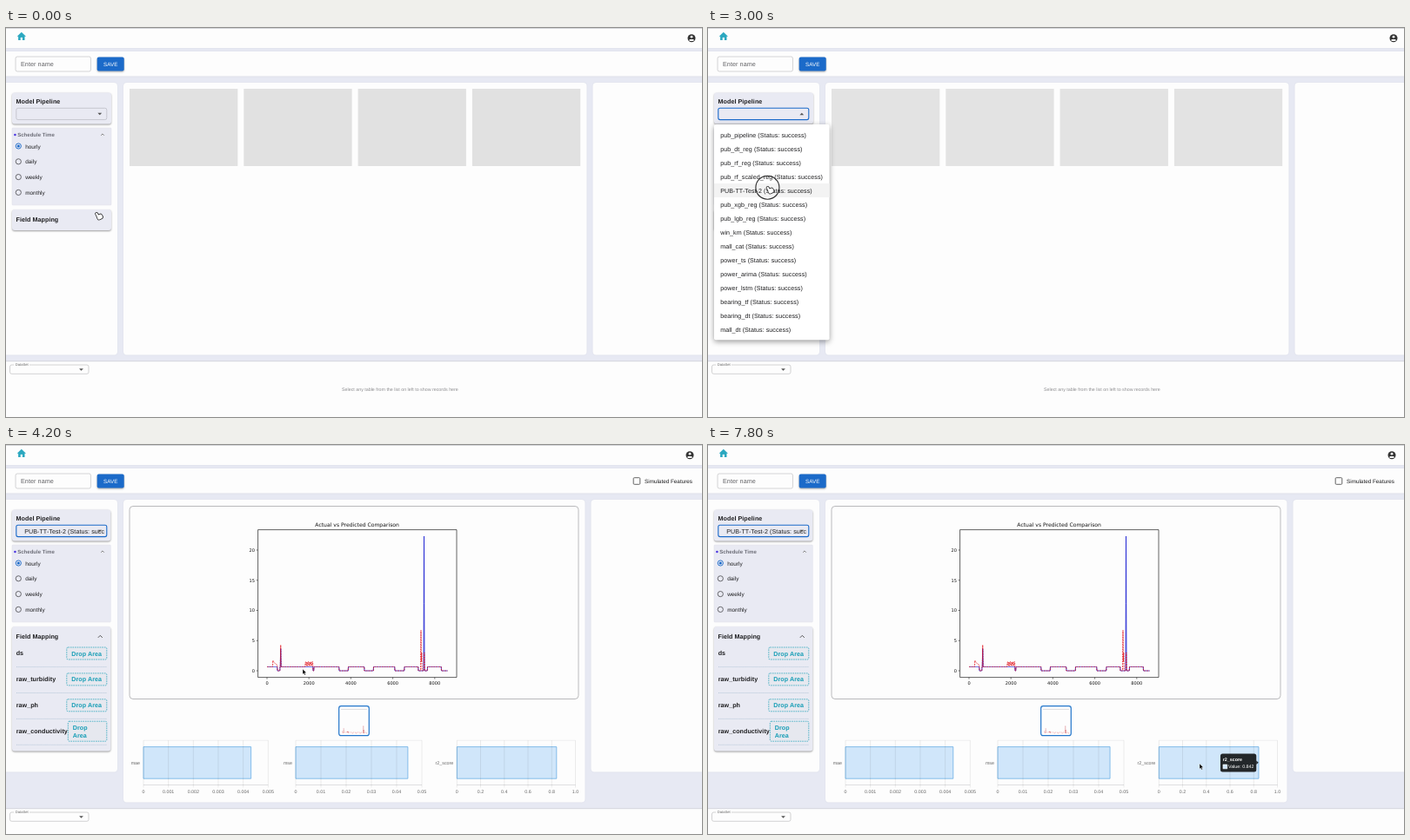
Recreate the animation shown at these times as an HTML page with a canvas. Size 800x448 px, loop 8 s.

```html
<!DOCTYPE html>
<html lang="en">
<head>
<meta charset="utf-8">
<title>Model pipeline setup</title>
<style>
html, body { margin: 0; width: 100%; height: 100%; overflow: hidden; background: #e8eaf4; }
canvas { display: block; width: 800px; height: 448px; }
</style>
</head>
<body>
<canvas id="stage" width="800" height="448"></canvas>
<script>
const c = document.getElementById('stage').getContext('2d');
const LOOP = 8000, STEP = 200;
const OPEN = 1200, CLOSE = 3200, LOADED = 3400, READY = 3600;
const CLICKS = [1000, 3000];
const SANS = '"Liberation Sans", Arial, sans-serif';
const DEJAVU = '"DejaVu Sans", sans-serif';
const WHITE = '#fdfdfd', CARD = '#e9eaf3', INK = '#1c1c1e', BLUE = '#1b6ac9', TEAL = '#139cb5';

const MODELS = ['pub_pipeline', 'pub_dt_reg', 'pub_rf_reg', 'pub_rf_scaled_reg', 'PUB-TT-Test-2',
  'pub_xgb_reg', 'pub_lgb_reg', 'win_km', 'mall_cat', 'power_ts', 'power_arima', 'power_lstm',
  'bearing_tf', 'bearing_dt', 'mall_dt'].map(name => name + ' (Status: success)');

const METRICS = [
  { name: 'mae', x: 158, w: 143.3, max: 0.005, digits: 3, value: 0.00432 },
  { name: 'mse', x: 333, w: 145, max: 0.05, digits: 2, value: 0.04451 },
  { name: 'r2_score', x: 518.3, w: 136.2, max: 1, digits: 1, value: 0.842 }
];

// Pointer stops: time, x, y
const PATH = [
  [0, 103.5, 213], [1000, 84, 98], [1800, 78, 122], [3000, 68, 183], [3400, 68, 183.5], [4200, 341, 258],
  [5000, 400, 365], [5400, 291.5, 364], [6200, 220, 365], [7200, 430, 368], [7800, 565, 367]
];

const clamp = v => Math.max(0, Math.min(1, v));

function pointer(t) {
  const i = Math.max(1, PATH.findIndex(p => p[0] >= t));
  const a = PATH[i - 1], b = PATH[i], k = clamp((t - a[0]) / (b[0] - a[0]));
  return { x: a[1] + (b[1] - a[1]) * k, y: a[2] + (b[2] - a[2]) * k };
}

function text(s, x, y, size, color = INK, { bold, align = 'left', font = SANS, gap = 0 } = {}) {
  c.font = (bold ? 'bold ' : '') + size + 'px ' + font;
  c.letterSpacing = gap + 'px';
  c.textAlign = align;
  c.fillStyle = color;
  c.fillText(s, x, y);
}
const label = (s, x, y, color, bold) => text(s, x, y, 7.11, color, { bold, gap: 0.067 });

function box(x, y, w, h, r, fill, stroke, lw = 0.6) {
  c.beginPath();
  c.roundRect(x, y, w, h, r);
  if (fill) { c.fillStyle = fill; c.fill(); }
  if (stroke) { c.strokeStyle = stroke; c.lineWidth = lw; c.stroke(); }
}

function line(points, color, lw, dash = []) {
  c.beginPath();
  points.forEach(([x, y]) => c.lineTo(x, y));
  c.strokeStyle = color;
  c.lineWidth = lw;
  c.setLineDash(dash);
  c.stroke();
  c.setLineDash([]);
}

function shape(points, fill) {
  c.beginPath();
  points.forEach(([x, y]) => c.lineTo(x, y));
  c.closePath();
  c.fillStyle = fill;
  c.fill();
}

function circle(x, y, r, fill, stroke, lw = 0.9) {
  c.beginPath();
  c.arc(x, y, r, 0, 7);
  if (fill) { c.fillStyle = fill; c.fill(); }
  if (stroke) { c.strokeStyle = stroke; c.lineWidth = lw; c.stroke(); }
}

function shadowed(blur, dy, alpha, draw) {
  c.save();
  c.shadowBlur = blur;
  c.shadowOffsetY = dy;
  c.shadowColor = `rgba(0,0,0,${alpha})`;
  draw();
  c.restore();
}
const card = (y, h, w) => shadowed(2, 1, 0.38, () => box(7, y, w, h, 3, CARD));
const triangle = (x, y, d) => shape([[x - 2.4, y - d * 1.2], [x + 2.4, y - d * 1.2], [x, y + d * 1.3]], '#555');
const chevron = (x, y, d, r, color) => line([[x - r, y + d * r / 2], [x, y - d * r / 2], [x + r, y + d * r / 2]], color, 0.9);

function icons(dx) {
  shape([[12.6, 9.8], [17.8, 4.8], [23, 9.8]], '#2ba8c0');
  box(14.1, 9, 7.4, 5, 0, '#2ba8c0');
  box(16.7, 10.9, 2.2, 3.1, 0, WHITE);
  const x = 788 + dx;
  circle(x, 11.8, 4.5, '#333');
  circle(x, 10.2, 1.4, WHITE);
  box(x - 2.7, 12.9, 5.4, 2, 1, WHITE);
}

function frameLayout(ready) {
  const dx = ready ? -2 : 0, grow = ready ? 35 : 0;
  box(0, 0, 800, 448, 0, '#e7e9f3');
  shadowed(2, 0, 0.06, () => {
    box(0, 0, 800, 23, 0, WHITE);
    box(0, 27, 800, 28.5, 0, WHITE);
    box(-5, 63, 133, 313.5, 4, WHITE);
    box(135, 63, 532.5 + dx, 313.5 + grow, 4, WHITE);
    box(674.5 + dx, 63, 140, 313.5, 4, WHITE);
  });
  box(0, 0, 800, 0.8, 0, '#c9cacf');
  box(0, 383.5 + grow, 800, 0.8, 0, '#c9cacf');
  box(0, 384.3 + grow, 800, 100, 0, WHITE);
  icons(dx);

  box(11, 33, 86.5, 17, 2, null, '#b9b9bd');
  text('Enter name', 17, 44.4, 7.2, '#5f5f63', { gap: 0.07 });
  shadowed(2, 1, 0.35, () => box(104.7, 33.5, 31, 16, 2, BLUE));
  text('SAVE', 112, 44, 6.3, '#fff', { gap: 0.08 });

  box(4.5, 388 + grow, 90.5, 10.3, 2, null, '#b5b5b8');
  box(9, 386 + grow, 18, 4, 0, WHITE);
  text('DataSet', 10.8, 389.3 + grow, 4.15, '#666');
  triangle(86.5, 393.4 + grow, 1);
  text('Select any table from the list on left to show records here', 386, 418 + grow, 5.32, '#8c8c8f');
}

function modelSelect(t) {
  label('Model Pipeline', 11.6, 87.2, INK, true);
  const focus = t >= OPEN, open = focus && t < CLOSE;
  box(11.8, 92.3, 104, 13.3, 2, null, focus ? BLUE : '#b8b9c0', focus ? 1.1 : 0.7);
  if (t >= CLOSE) {
    c.save();
    c.beginPath();
    c.rect(13, 93, 100, 12);
    c.clip();
    label(MODELS[4], 21.2, 101.6);
    c.restore();
  }
  triangle(107.8, 99, open ? -1 : 1);
}

function schedule(w) {
  box(7, 115, w, 89, 1, CARD, '#dcdde6', 0.5);
  circle(10.4, 123, 1.3, '#4a35e0');
  text('Schedule Time', 13.2, 125.2, 6.05, '#6d6e78', { bold: true });
  chevron(111, 122.8, 1, 1.8, '#777');
  ['hourly', 'daily', 'weekly', 'monthly'].forEach((s, i) => {
    const y = 136 + i * 17.8;
    circle(14.3, y, 3.1, null, i ? '#5a5a5e' : BLUE);
    if (!i) circle(14.3, y, 1.6, BLUE);
    text(s, 22.2, y + 2.5, 6.4);
  });
}

function dropArea(x, y, w, words) {
  const h = 5 + words.length * 9;
  c.setLineDash([1.6, 1]);
  box(x, y - h / 2, w, h, 1.5, '#e6e8ef', TEAL, 0.7);
  c.setLineDash([]);
  words.forEach((s, i) => label(s, x + 5.5, y + 2.5 + (i - (words.length - 1) / 2) * 9, TEAL, true));
}

function fieldMapping(loaded, w) {
  card(209, loaded ? 143.5 : 24, w);
  label('Field Mapping', 11.6, 223.2, INK, true);
  chevron(108.3, loaded ? 220.6 : 219, loaded ? 1 : -1, 2.5, '#444');
  if (!loaded) return;
  ['ds', 'raw_turbidity', 'raw_ph', 'raw_conductivity'].forEach((s, i) => {
    const y = 240 + i * 29.9;
    label(s, 11.7, y + 2.3, INK, true);
    line([[12, y + 15.6], [116, y + 15.6]], '#9db6cc', 0.6, [1.3, 1]);
    if (s.length < 15) dropArea(69.8, y, 46, ['Drop Area']);
    else dropArea(71.3, y, 44.5, ['Drop', 'Area']);
  });
}

function sidebar(t) {
  const w = t >= READY ? 113.3 : 114;
  card(74.5, 36, w);
  modelSelect(t);
  schedule(w);
  fieldMapping(t >= LOADED, w);
}

function skeleton(t, loaded) {
  const g = t < 1200 ? 225 + t / 120 : 235 - 14 * clamp((t - 2400) / 1000);
  const fill = `rgb(${g},${g},${g})`;
  if (!loaded) {
    for (let i = 0; i < 4; i++) box(142 + i * 131.3, 70, 124.3, 89, 0, fill);
    return;
  }
  box(142, 70, 518.3, 134, 0, fill);
  for (let i = 0; i < 6; i++) box(142 + i * 87.55, 211, 80.5, 35.5, 0, fill);
}

// Series values over x in stage pixels: a two-level signal with spikes
const LOWS = [[312, 3], [353, 1], [383, 10.5], [412, 10.5], [447, 11], [474, 10.5], [500.5, 8]];
const level = x => LOWS.some(([from, w]) => x >= from && x < from + w) ? 0 : 0.65;
const spike = (x, at, h) => h * Math.max(0, 1 - Math.abs(x - at) / 0.5);
const actual = x => level(x) + spike(x, 315.75, 3) + spike(x, 480.5, 22.3);
function predicted(x) {
  let v = level(x) + spike(x, 315.75, 3.6) + spike(x, 477, 6.7) + spike(x, 477.75, 3) + spike(x, 480.75, 3);
  if (x > 306.5 && x < 312) v += Math.exp((307 - x) / 4);
  if (x > 343.5 && x < 353) v += 0.5 + 0.35 * Math.sin(x * 4);
  return v;
}
function series(fn, x0, sx, y0, sy) {
  const points = [];
  for (let x = 300; x <= 507.5; x += 0.25) points.push([x0 + (x - 300) * sx, y0 - fn(x) * sy]);
  return points;
}

function comparison() {
  box(142, 70.5, 516, 222, 4, null, '#a9a9ad', 0.8);
  const opt = { font: DEJAVU, align: 'center' };
  text('Actual vs Predicted Comparison', 403.6, 94.2, 6.09, '#111', opt);
  box(289.6, 97.6, 228.4, 170, 0, null, '#222', 0.7);
  for (let i = 0; i < 5; i++) {
    const x = 300 + i * 48.2, y = 260 - i * 34.75;
    line([[x, 267.6], [x, 269.6]], '#222', 0.6);
    line([[287.6, y], [289.6, y]], '#222', 0.6);
    text(i * 2000, x, 275.8, 5.07, '#111', opt);
    text(i * 5, 286, y + 1.9, 5.07, '#111', { font: DEJAVU, align: 'right' });
  }
  c.lineJoin = 'round';
  line(series(actual, 300, 1, 260, 6.95), '#2226d4', 0.9);
  line(series(predicted, 300, 1, 260, 6.95), '#e2141c', 0.9, [1.7, 1.1]);

  box(382.7, 300.7, 34.6, 34, 2.5, WHITE, '#2376cb', 1.2);
  line([[385, 304.4], [415, 304.4]], '#c4c4c8', 0.6);
  line(series(predicted, 386, 0.14, 331.8, 1.25), '#d2696c', 0.5, [1.2, 0.8]);
  c.lineJoin = 'miter';
}

function barChart(m, dy, progress) {
  const top = 251 + dy, base = 302.3 + dy;
  line([[m.x, top], [m.x + m.w, top]], '#e2e2e4', 0.6);
  line([[m.x, base], [m.x + m.w, base]], '#d2d2d5', 0.7);
  box(m.x, 258.4 + dy, m.w * m.value / m.max * progress, 36.6, 0, '#d0e6fa', '#5ba7e2', 0.7);
  for (let i = 0; i <= 5; i++) {
    const x = m.x + m.w * i / 5;
    line([[x, top], [x, base + 3]], 'rgba(0,0,0,0.13)', 0.6);
    text(i ? (m.max * i / 5).toFixed(m.digits) : '0', x, 311.9 + dy, 5.33, '#666', { align: 'center' });
  }
  text(m.name, m.x - 4, 278.6 + dy, 5.33, '#666', { align: 'right' });
}

function tooltip(m, alpha) {
  const end = m.x + m.w * m.value / m.max, x = end - 44;
  c.globalAlpha = alpha;
  box(x, 355.4, 41.3, 21, 2.5, 'rgba(0,0,0,0.83)');
  shape([[x + 41.3, 363.5], [end - 0.3, 365.8], [x + 41.3, 368.1]], 'rgba(0,0,0,0.83)');
  text(m.name, x + 2.8, 363.5, 5.33, '#fff', { bold: true });
  box(x + 3, 368, 4.8, 4.8, 0, '#cfe6fb', '#fff', 0.6);
  text('Value: ' + m.value.toFixed(3), x + 9, 372.4, 5.33, '#fff');
  c.globalAlpha = 1;
}

function over(m, t) {
  const p = pointer(t);
  return t > READY && p.y > 347 && p.y < 384 && p.x >= m.x && p.x <= m.x + m.w * m.value / m.max;
}

function metrics(t, ready) {
  const progress = 1 - Math.pow(1 - clamp((t - LOADED + 5) / 1000), 4);
  METRICS.forEach(m => barChart(m, ready ? 89.2 : 0, progress));
  METRICS.forEach(m => {
    if (over(m, t)) tooltip(m, 1);
    else if (over(m, t - STEP)) tooltip(m, 0.38);
  });
}

function menu(t, p) {
  c.globalAlpha = 1 - clamp((t - CLOSE) / 210);
  shadowed(6, 2, 0.4, () => box(7, 111, 132.6, 248.3, 2, '#fff'));
  const row = Math.max(0, Math.floor((p.y - 113) / 16));
  box(7, 115 + row * 16, 132.6, 16, 0, row ? '#f3f3f3' : '#d6d6d6');
  MODELS.forEach((s, i) => label(s, 14.2, 125.6 + i * 16));
  c.globalAlpha = 1;
}

function hand() {
  c.rotate(-0.5);
  c.beginPath();
  c.roundRect(-1, 0, 2.2, 6, 1.1);
  c.roundRect(-1.4, 3.6, 6, 5, 1.8);
  c.strokeStyle = '#333';
  c.lineWidth = 1.7;
  c.stroke();
  c.fillStyle = '#fff';
  c.fill();
}

function arrow() {
  shape([[0, 0], [0, 6], [1.3, 4.9], [2.3, 7.1], [3.4, 6.6], [2.4, 4.5], [4.2, 4.3]], '#000');
  c.strokeStyle = '#fff';
  c.lineWidth = 0.4;
  c.stroke();
}

function drawPointer(t, { x, y }) {
  c.save();
  c.translate(x, y);
  if (t < READY) hand();
  else arrow();
  c.restore();
  if (CLICKS.includes(t)) circle(x + 0.4, y + 0.7, 13.5, null, '#2a2a2a', 1.1);
}

function draw(t) {
  const loaded = t >= LOADED, ready = t >= READY, p = pointer(t);
  c.textRendering = 'geometricPrecision';
  frameLayout(ready);
  sidebar(t);
  if (ready) comparison();
  else skeleton(t, loaded);
  if (loaded) {
    const dx = ready ? -2 : 0;
    box(723.2 + dx, 37.7, 7.6, 7.6, 1, null, '#555', 0.9);
    text('Simulated Features', 736 + dx, 44, 6.35);
    metrics(t, ready);
  }
  if (t >= OPEN && t <= LOADED) menu(t, p);
  drawPointer(t, p);
}

// The picture advances in whole steps, with hard changes between them
function tick(now) {
  draw(Math.floor(now % LOOP / STEP) * STEP);
  requestAnimationFrame(tick);
}
draw(0);
requestAnimationFrame(tick);
</script>
</body>
</html>
```
